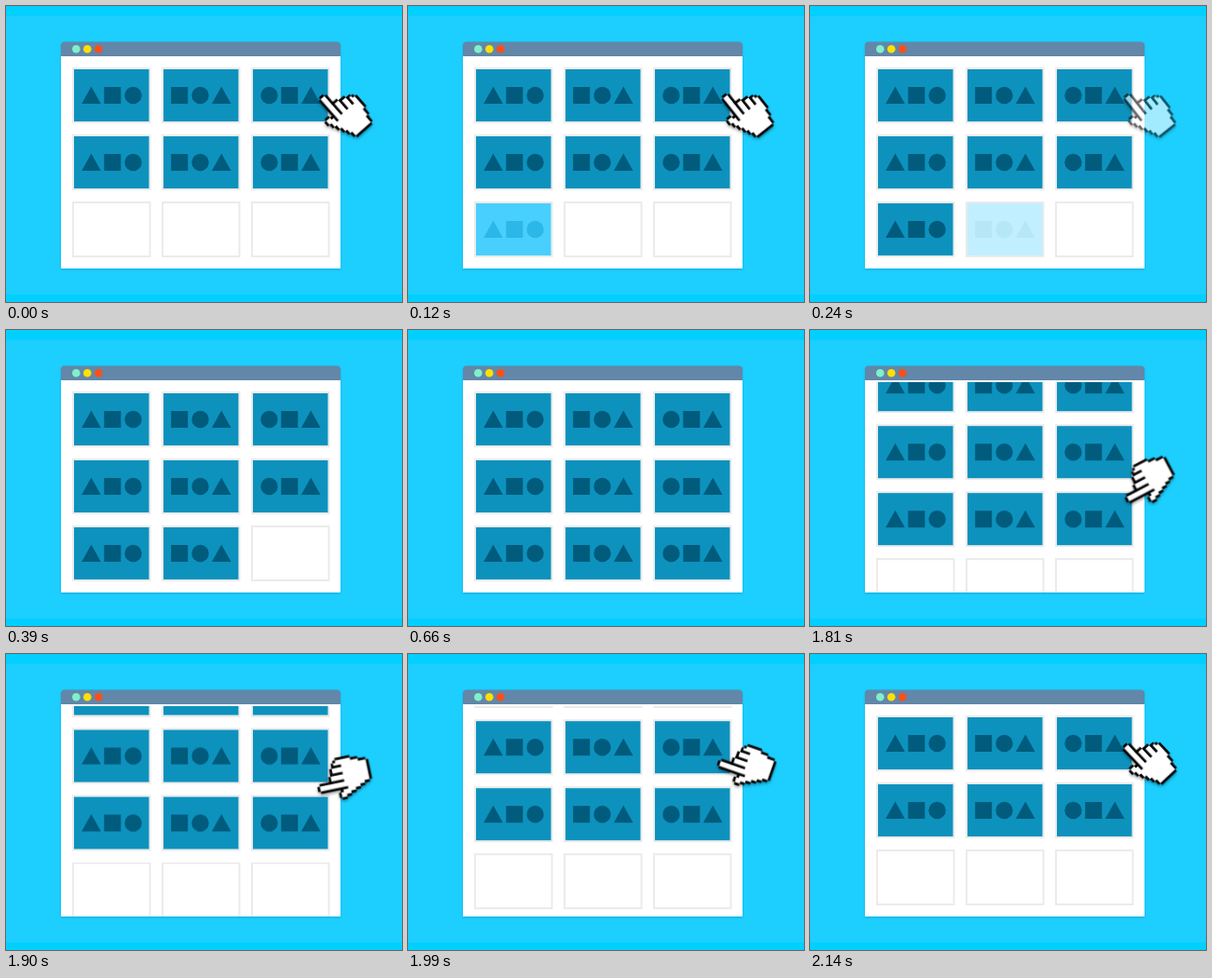
Animation of 425 by 318 pixels, one loop 2170 ms. Source, as an HTML page:

```html
<!DOCTYPE html>
<html lang="en">
<head>
<meta charset="utf-8">
<title>Infinite scroll</title>
<style>
  html, body { margin: 0; width: 100%; height: 100%; overflow: hidden; background: #00cfff; }
  svg { display: block; width: 100vw; height: 100vh; }

  .window { filter: drop-shadow(0 1px 1px rgba(0, 60, 90, .25)); }
  .grid { fill: #0d92be; color: #005b7c; }
  .slot { fill: none; stroke: #ebebeb; stroke-width: 2; }

  .grid, .new, .move, .spin { animation: 2170ms linear infinite; }
  .grid { animation-name: scroll; }
  .new1 { animation-name: load1; }
  .new2 { animation-name: load2; }
  .new3 { animation-name: load3; }

  /* The swipe runs across the loop point, so its clock starts at 1630 ms. */
  .move, .spin { animation-delay: -540ms; }
  .move { animation-name: swipe, fade; filter: drop-shadow(0 2px 1.5px rgba(0, 0, 0, .35)); }
  .spin { animation-name: turn; }

  @keyframes scroll {
    0%, 75.12% { transform: none; animation-timing-function: cubic-bezier(.4, 0, .2, 1); }
    98.62%, 100% { transform: translateY(-72px); }
  }
  @keyframes load1 {
    0%, 1.38% { opacity: 0; fill: #4ad0ff; color: #2bb8e8; }
    5.53% { opacity: 1; fill: #4ad0ff; color: #2bb8e8; }
    9.68%, 100% { opacity: 1; fill: #0d92be; color: #005b7c; }
  }
  @keyframes load2 {
    0%, 9.68% { opacity: 0; fill: #4ad0ff; color: #2bb8e8; }
    13.82% { opacity: 1; fill: #4ad0ff; color: #2bb8e8; }
    17.74%, 100% { opacity: 1; fill: #0d92be; color: #005b7c; }
  }
  @keyframes load3 {
    0%, 20.74% { opacity: 0; fill: #4ad0ff; color: #2bb8e8; }
    24.88% { opacity: 1; fill: #4ad0ff; color: #2bb8e8; }
    29.49%, 100% { opacity: 1; fill: #0d92be; color: #005b7c; }
  }
  @keyframes swipe {
    0% { transform: translate(-1px, 100px); animation-timing-function: cubic-bezier(.4, 0, .2, 1); }
    23.5%, 100% { transform: translate(0, 0); }
  }
  @keyframes turn {
    0% { transform: rotate(-83deg); animation-timing-function: cubic-bezier(.65, 0, .35, 1); }
    30.4%, 100% { transform: rotate(4deg); }
  }
  @keyframes fade {
    0% { opacity: 0; }
    1.3% { opacity: 0; }
    1.35% { opacity: .3; }
    4.6%, 33.2% { opacity: 1; }
    40.1%, 100% { opacity: 0; }
  }
</style>
</head>
<body>
<svg viewBox="0 0 425 318" preserveAspectRatio="none">
  <defs>
    <clipPath id="view"><rect x="60" y="56.5" width="298" height="224.7"/></clipPath>

    <path id="tri" d="M0-9.5L10.3 9H-10.3Z"/>
    <rect id="sq" x="-9" y="-9" width="18" height="18"/>
    <circle id="dot" r="9.2"/>
    <rect id="face" width="80.5" height="56"/>

    <g id="card1">
      <use href="#face"/>
      <g fill="currentColor">
        <use href="#tri" x="18.5" y="28"/><use href="#sq" x="41.3" y="28"/><use href="#dot" x="63.5" y="28"/>
      </g>
    </g>
    <g id="card2">
      <use href="#face"/>
      <g fill="currentColor">
        <use href="#sq" x="17.2" y="28"/><use href="#dot" x="39.5" y="28"/><use href="#tri" x="62.2" y="28"/>
      </g>
    </g>
    <g id="card3">
      <use href="#face"/>
      <g fill="currentColor">
        <use href="#dot" x="17.5" y="28"/><use href="#sq" x="39.3" y="28"/><use href="#tri" x="62.2" y="28"/>
      </g>
    </g>

    <rect id="slot" class="slot" x="-1" y="-1" width="82.5" height="58"/>
    <g id="slots"><use href="#slot"/><use href="#slot" x="96"/><use href="#slot" x="192"/></g>
    <g id="cards"><use href="#card1"/><use href="#card2" x="96"/><use href="#card3" x="192"/></g>

    <path id="palm" d="M5 1H7V6H10V7H13V8H15V9H16V15H15V18H14V21H6V19H5V17H4V15H3V13H2V11H1V9H3V10H4V12H5Z"/>
  </defs>

  <rect width="425" height="318" fill="#00cfff"/>
  <rect y="10.5" width="425" height="299.5" fill="#1ccfff"/>

  <g class="window">
    <path d="M59 54H359V282H59Z" fill="#fff"/>
    <path d="M59 54V42.5Q59 38.5 63 38.5H355Q359 38.5 359 42.5V54Z" fill="#6287a8"/>
  </g>
  <circle cx="75.3" cy="46.2" r="4.3" fill="#7ff0cb"/>
  <circle cx="87.3" cy="46.2" r="4.3" fill="#ffe000"/>
  <circle cx="99.3" cy="46.2" r="4.3" fill="#f9501a"/>

  <g clip-path="url(#view)">
    <g class="grid">
      <g transform="translate(73 68)">
        <use href="#slots"/><use href="#slots" y="72"/><use href="#slots" y="144"/><use href="#slots" y="216"/>
        <use href="#cards"/><use href="#cards" y="72"/>
        <use class="new new1" href="#card1" y="144"/>
        <use class="new new2" href="#card2" x="96" y="144"/>
        <use class="new new3" href="#card3" x="192" y="144"/>
      </g>
    </g>
  </g>

  <g class="move">
    <g transform="translate(362.5 114.3)">
      <g class="spin">
        <g transform="rotate(-42.5) scale(2.7) translate(-8.5 -11)">
          <use href="#palm" x="-1"/><use href="#palm" x="1"/><use href="#palm" y="-1"/><use href="#palm" y="1"/>
          <use href="#palm" fill="#fff"/>
          <path d="M7 5h1v6h-1zM10 6h1v5h-1zM13 7h1v4h-1z"/>
        </g>
      </g>
    </g>
  </g>
</svg>
</body>
</html>
```
